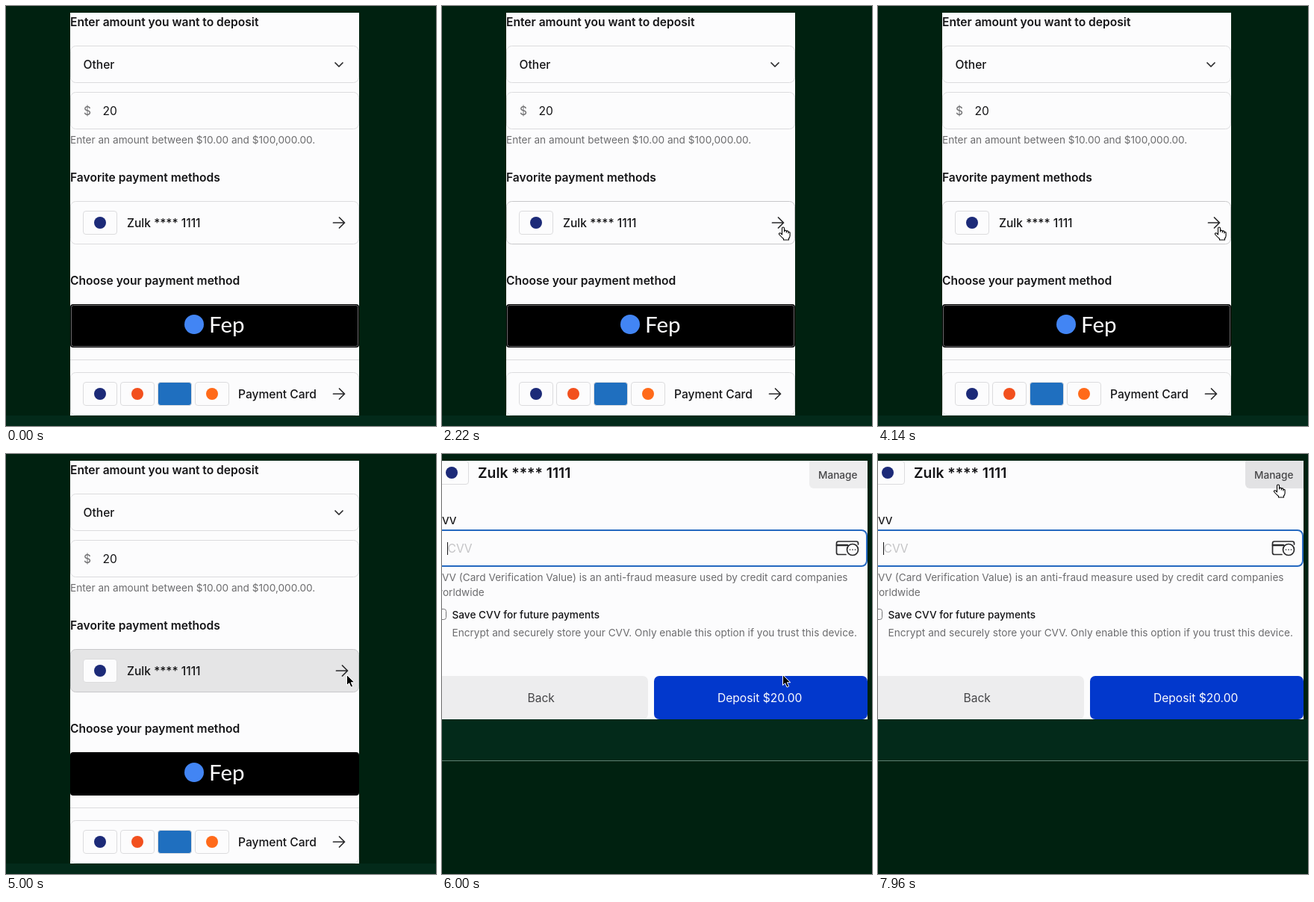
These frames come from a looping animation (576x562 px, 8 s). An HTML page:

```html
<!DOCTYPE html>
<html lang="en">
<head>
<meta charset="utf-8">
<title>Deposit</title>
<style>
  html, body { margin: 0; width: 100%; height: 100%; overflow: hidden; background: #002110; }
  svg { display: block; width: 576px; height: 562px; }
  text { font-family: Inter, sans-serif; fill: #151517; }
  .muted { fill: #6c6c6e; }
  .soft { fill: #464648; }
  .line { fill: none; stroke: #dcdcde; }
  .icon { fill: none; stroke: #29292b; stroke-width: 1.7; stroke-linecap: round; stroke-linejoin: round; }
  .cursor { stroke-linejoin: round; }
</style>
</head>
<body>
<svg id="stage" viewBox="0 0 576 562"></svg>
<script>
const LOOP = 8000;
const PAPER = '#fcfcfd', EDGE = '#dcdcde', GREY = '#ededee', BAND = '#032a1a', NAVY = '#1c2a78';
const BODY = 15.58, SMALL = 13.63, TITLE = 19.3;

// y is the middle of the capital letters
const text = (x, y, str, size = BODY, weight = 400, attrs = '') =>
  `<text x="${x}" y="${y + size * 0.364}" font-size="${size}" font-weight="${weight}" ${attrs}>${str}</text>`;
const rect = (x, y, w, h, r, attrs) =>
  `<rect x="${x}" y="${y}" width="${w}" height="${h}" rx="${r}" ${attrs}/>`;
const circle = (x, y, r, fill) => `<circle cx="${x}" cy="${y}" r="${r}" fill="${fill}"/>`;
const box = (y, h, attrs = 'class="line"') => rect(86.5, y + 0.5, 386, h - 1, 7, attrs);
const arrow = (y, id = '') =>
  `<path ${id} class="icon" d="M438.5 ${y}H453.5M446.5 ${y - 7}l7 7l-7 7"/>`;
const card = (x, y, fill) => rect(x + 0.5, y + 0.5, 45, 31, 3.5, `fill="${fill}" stroke="${EDGE}"`);
const tile = (x, y, color) => card(x, y, PAPER) + circle(x + 23, y + 16, 8, color);

const muted = 'class="muted"', soft = 'class="soft"';

const choosePage = `
  ${rect(0, 548, 576, 14, 0, `fill="${BAND}"`)}
  ${rect(86, 9, 387, 539, 0, `fill="${PAPER}"`)}
  ${text(86, 21, 'Enter amount you want to deposit', BODY, 600)}
  ${box(53, 50)}
  ${text(103.5, 78, 'Other', BODY, 500)}
  <path class="icon" d="M441 76l5 5l5-5"/>
  ${box(115, 50)}
  ${text(104, 140, '$', BODY, 400, muted)}
  ${text(129.5, 140, '20')}
  ${text(86, 179, 'Enter an amount between $10.00 and $100,000.00.', SMALL, 400, muted)}
  ${text(86, 229, 'Favorite payment methods', BODY, 600)}
  ${box(261, 58, `id="row" fill="${PAPER}" stroke="${EDGE}"`)}
  ${tile(103, 274, NAVY)}
  ${text(162, 290, 'Zulk **** 1111', BODY, 500)}
  ${arrow(290, 'id="rowArrow"')}
  ${text(86, 367, 'Choose your payment method', BODY, 600)}
  ${rect(86, 399, 387, 58, 4, 'fill="#000"')}
  ${rect(87.5, 400.5, 384, 55, 3, 'id="ring" fill="none" stroke="#868688" stroke-width=".8"')}
  ${circle(252, 426, 13, '#4285f4')}
  <text x="272" y="437" font-size="29.5" style="font-family:Lato,sans-serif;fill:${PAPER}">Fep</text>
  <path class="line" d="M86 473.5H473"/>
  ${box(490, 58)}
  ${tile(103, 503, NAVY)}
  ${tile(153, 503, '#f2501e')}
  ${card(203, 503, '#1f6fbf')}
  ${tile(253, 503, '#ff6a1a')}
  ${text(311, 519, 'Payment Card', BODY, 500)}
  ${arrow(519)}`;

const confirmPage = `
  ${rect(0, 355, 576, 55, 0, `fill="${BAND}"`)}
  <path d="M0 410.5H576" stroke="#5f7f70"/>
  ${rect(0, 9, 570, 346, 0, `fill="${PAPER}"`)}
  ${tile(-10, 9, NAVY)}
  ${text(48, 25, 'Zulk **** 1111', TITLE, 600)}
  <path id="manage" d="M492 9H570V46H498a6 6 0 0 1-6-6z" fill="${GREY}"/>
  ${text(504, 28, 'Manage', SMALL, 500, soft)}
  ${text(-10, 89, 'CVV', SMALL, 500)}
  ${rect(-20, 102, 589, 48, 7, 'fill="none" stroke="#2468c0" stroke-width="2"')}
  ${text(7.5, 126, 'CVV', BODY, 400, 'style="fill:#c4c4c6"')}
  <path id="caret" d="M7.5 118V135" stroke="#151517"/>
  <g class="icon">
    <path d="M541 134.5H531a2.5 2.5 0 0 1-2.5-2.5V119.5a2.5 2.5 0 0 1 2.5-2.5H555a2.5 2.5 0 0 1 2.5 2.5V121"/>
    <path d="M529 122H543" stroke-width="2.6"/>
    <circle cx="550" cy="128" r="7.5"/>
    <path d="M546.5 128h.01M550 128h.01M553.5 128h.01"/>
  </g>
  ${text(-10, 165, 'CVV (Card Verification Value) is an anti-fraud measure used by credit card companies', SMALL, 400, muted)}
  ${text(-10, 185, 'worldwide', SMALL, 400, muted)}
  ${rect(-9, 207.5, 14.5, 14, 3, 'fill="none" stroke="#757577"')}
  ${text(13.5, 215, 'Save CVV for future payments', SMALL, 500)}
  ${text(13.5, 239, 'Encrypt and securely store your CVV. Only enable this option if you trust this device.', SMALL, 400, muted)}
  ${rect(-20, 297, 296, 58, 7, `fill="${GREY}"`)}
  ${text(114.5, 326, 'Back', BODY, 400, soft)}
  ${rect(284, 297, 286, 58, 7, 'fill="#0238cc"')}
  ${text(369, 326, 'Deposit $20.00', BODY, 400, `style="fill:${PAPER}"`)}`;

const cursor = `
  <g id="cursor" class="cursor">
    <path id="pointer" d="M.5.5V14.5L3.7 11.6L6 17L8.6 15.9L6.3 10.7H10.8Z" fill="#000" stroke="#fff"/>
    <path id="hand" fill="#fff" stroke="#000" stroke-width="1.1"
      d="M-.5 10V2.5a1.5 1.5 0 0 1 3 0V7V6.5a1.4 1.4 0 0 1 2.8 0V8V7.2a1.3 1.3 0 0 1 2.6 0V9V8.3a1.1 1.1 0 0 1 2.2 0V12.5Q10 14.5 8.5 16V18H1.5V16.5Q-1 14.5-4.5 10.5Q-4.9 8.6-3 8.7Q-1.7 9-.5 11Z"/>
  </g>`;

const stage = document.getElementById('stage');
stage.innerHTML = `<g id="choose">${choosePage}</g><g id="confirm">${confirmPage}</g>${cursor}`;

const begin = document.timeline.currentTime || 0;

// steps: [time, value, easing towards the next step]
function track(id, prop, steps) {
  const full = [...steps, [LOOP, steps.at(-1)[1]]];
  const frames = full.map(([time, value, easing = 'step-end']) =>
    ({ offset: time / LOOP, [prop]: value, easing }));
  const anim = document.getElementById(id).animate(frames, { duration: LOOP, iterations: Infinity });
  anim.startTime = begin;
}
const at = (x, y) => `translate(${x}px, ${y}px)`;
const show = (id, ...flips) =>
  track(id, 'visibility', flips.map(([time, on]) => [time, on ? 'visible' : 'hidden']));

const HOVER = 960, PRESS = 4740, NEXT = 5260, MANAGE = 7040;

track('cursor', 'transform', [
  [0, at(590, 560)],
  [20, at(590, 560), 'ease-out'],
  [360, at(476, 445)],
  [640, at(476, 445), 'ease-out'],
  [1100, at(464, 300)],
  [1480, at(464, 300), 'ease-in-out'],
  [1940, at(456, 295)],
  [6380, at(456, 295), 'ease-in-out'],
  [7120, at(535, 40)],
]);
show('pointer', [0, 1], [HOVER, 0], [PRESS, 1], [MANAGE, 0]);
show('hand', [0, 0], [HOVER, 1], [PRESS, 0], [MANAGE, 1]);

track('rowArrow', 'transform', [[0, at(0, 0)], [HOVER, at(0, 0), 'linear'], [1240, at(4, 0)]]);
track('row', 'stroke', [[0, EDGE], [HOVER, EDGE, 'linear'], [1240, '#c8c8ca']]);
track('row', 'fill', [[0, PAPER], [PRESS, '#e5e5e6']]);
show('ring', [0, 1], [PRESS, 0]);

track('choose', 'opacity', [[0, 1], [NEXT, 0]]);
track('confirm', 'opacity', [[0, 0], [NEXT, 1]]);
track('caret', 'opacity', [[0, 0], [NEXT, 1], [6040, 0], [6540, 1], [7040, 0], [7540, 1]]);
track('manage', 'fill', [[0, GREY], [MANAGE, GREY, 'linear'], [7240, '#e2e2e4']]);
</script>
</body>
</html>
```
